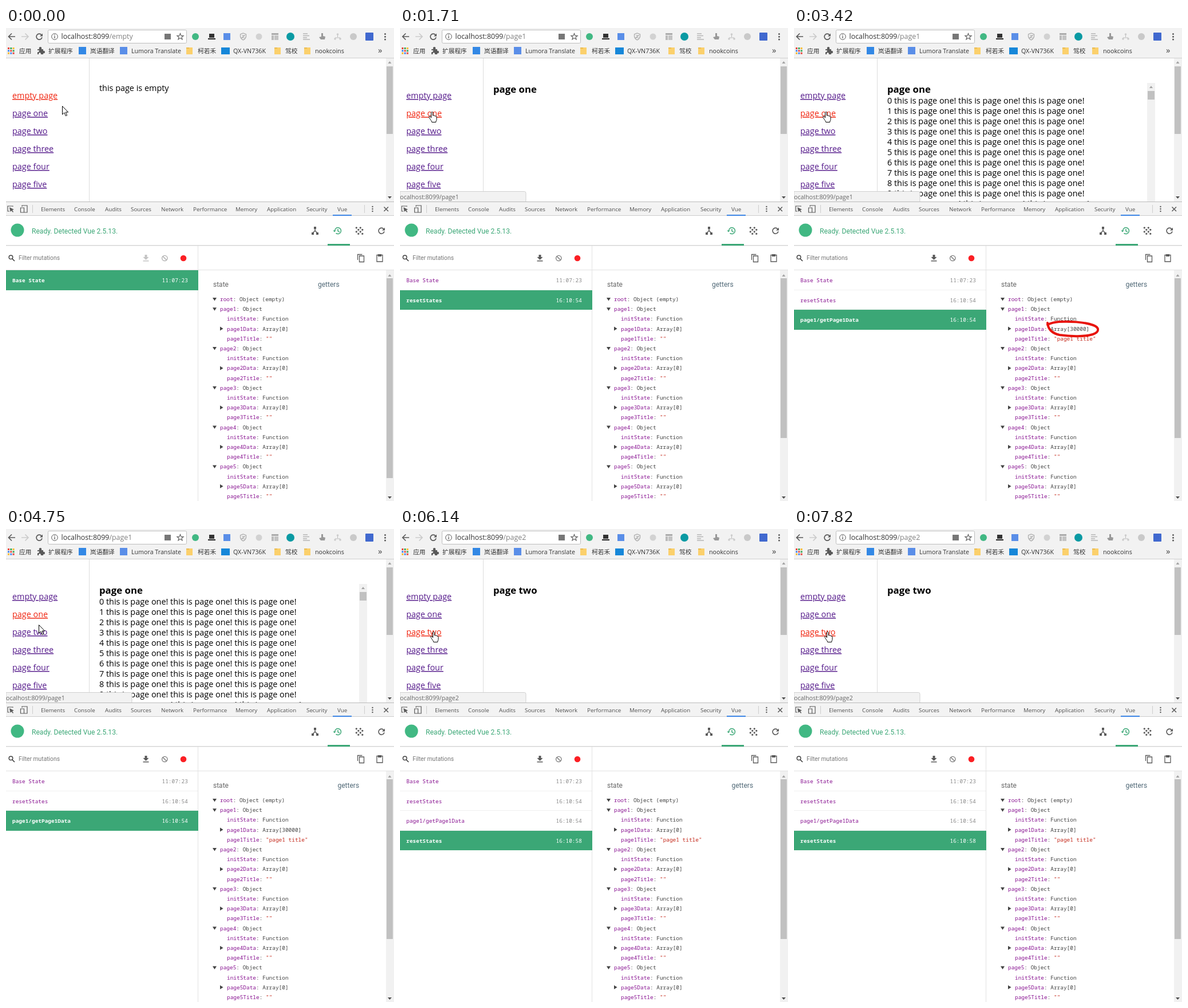
Animation, 678 px wide and 826 px high, one loop 8000 ms. Source, as an HTML page:

```html
<!DOCTYPE html>
<html lang="en">
<head>
<meta charset="utf-8">
<title>State inspector demo</title>
<style>
  html, body { margin: 0; width: 100%; height: 100%; overflow: hidden; background: #fff; }
  svg { display: block; }
  text { white-space: pre; }
  .ui { font-family: "Open Sans", "Noto Sans CJK SC", "Noto Sans CJK", sans-serif; }
  .app { font-family: Roboto, sans-serif; }
  .mono { font-family: "Noto Sans Mono", "DejaVu Sans Mono", monospace; font-size: 9.45px; }
  .link { text-decoration: underline 1px; }
  .bold { font-weight: 700; }
</style>
</head>
<body>
<svg id="stage" width="678" height="826" viewBox="0 0 678 826">
  <defs><clipPath id="page"><path d="M0 53H678V304H0z"/></clipPath></defs>
  <g id="base"></g>
  <g id="live"></g>
</svg>
<script>
const LOOP = 8000;
const STEPS = [0, 320, 670, 1350, 1710, 3070, 3420, 4750, 5100, 5460, 6140, 6470, 7820];
const GREEN = '#3ba776', KEY = '#881391', INK = '#5a5a5a', PALE = '#c4c4c4';

const text = (x, y, s, size, fill, cls = 'ui') =>
  `<text x="${x}" y="${y}" class="${cls}" ${size ? `font-size="${size}"` : ''} fill="${fill}">${s}</text>`;
const mono = (x, y, s, fill, cls = '') => text(x, y, s, 0, fill, 'mono ' + cls);
const rect = (x, y, w, h, fill, more = '') =>
  `<rect x="${x}" y="${y}" width="${w}" height="${h}" fill="${fill}" ${more}/>`;
const dot = (x, y, r, fill, more = '') => `<circle cx="${x}" cy="${y}" r="${r}" fill="${fill}" ${more}/>`;
const shape = (d, fill, more = '') => `<path d="${d}" fill="${fill}" ${more}/>`;
const line = (d, color, w = 1, more = '') =>
  `<path d="${d}" fill="none" stroke="${color}" stroke-width="${w}" ${more}/>`;
const at = (x, y, s) => `<g transform="translate(${x} ${y})">${s}</g>`;
const range = (n, f) => Array.from({ length: n }, (_, i) => f(i)).join('');

const upArrow = (x, y) => shape(`M${x - 3} ${y + 2}l3-4 3 4z`, '#a3a3a3');
const downArrow = (x, y) => shape(`M${x - 3.5} ${y - 2}l3.5 4 3.5-4z`, '#505050');
const reload = (x, y, r, color, w) => at(x, y,
  line(`M${r * .8} ${-r * .6}A${r} ${r} 0 1 0 ${r} ${r * .25}`, color, w) +
  shape(`M${r + 1} ${-r - .5}v${r}h${-r}z`, color));

function addressBar() {
  const folder = x => rect(x, 34, 11, 12, '#fbd06c') + rect(x, 34, 5, 2, '#e9bb51');
  const label = (x, s) => text(x, 44, s, 10.7, '#333');
  const colors = ['#e8453c', '#3aa757', '#f9bb2d', '#4688f1'];
  return rect(0, 0, 678, 52, '#f2f2f2') + rect(0, 52, 678, 1, '#cfcfcf') +
    line('M16 15H5M10 9.5L4.5 15l5.5 5.5', INK, 1.7) +
    line('M27 15h11M33.5 9.5l5.5 5.5-5.5 5.5', '#cbcbcb', 1.7) +
    reload(58, 15, 5, INK, 1.7) +
    rect(73.5, 3.5, 242, 23, '#fff', 'rx="2" stroke="#bdbdbd"') +
    dot(85, 15, 5.3, 'none', `stroke="${INK}"`) + rect(84.4, 14, 1.3, 4, INK) + rect(84.4, 11.5, 1.3, 1.4, INK) +
    rect(277, 10, 11, 10, '#777') +
    line('M304.5 9.5l1.6 4h4l-3.2 2.5 1.2 4-3.6-2.4-3.6 2.4 1.2-4-3.2-2.5h4z', INK, 1.1) +
    // extension buttons
    dot(331, 15, 6, '#41b883') +
    rect(355, 10, 9, 7, '#333') + rect(353, 18, 13, 2, '#222') +
    rect(380, 9, 12, 12, '#5a8ee8') +
    line('M414.5 9l5 2v4q-1 4-5 6q-4-2-5-6v-4zM412 13h5l-5 4h5', '#aaa', 1.2) +
    dot(442, 15, 5.5, '#d2d2d2') +
    rect(464, 9, 12, 3, '#aaa') + rect(464, 13, 4, 8, '#bbb') + rect(469, 13, 7, 8, '#c3c3c3') +
    dot(497, 15, 7, '#0a9aa3') +
    line('M519 10h8M519 13.5h11M519 17h7M519 20h12', '#b5b5b5', 1.6) +
    shape('M551 9h3v5l4 1-1 5h-7l-3-4 4-1z', '#999') +
    line('M579.5 11v5M575 20v-3h9v3', '#bbb') +
    dot(579.5, 11, 1.8, '#ccc') + dot(575, 19, 1.8, '#ccc') + dot(584, 19, 1.8, '#ccc') +
    dot(607, 15, 6, '#c9c9c9') +
    rect(628, 8, 14, 14, '#4169cf', 'rx="1"') +
    range(3, i => dot(662.5, 10.5 + i * 4.7, 1.5, INK)) +
    // bookmarks
    range(9, i => rect(3 + i % 3 * 4.3, 34 + (i / 3 | 0) * 4.3, 3, 3, colors[i % 4])) +
    label(23, '应用') +
    shape('M55 37h3q-1-4 2-4t2 4h3v3q3-1 3 2t-3 2v2h-4q0-3-2-3t-2 3h-2v-4q3 0 3-2t-3-1z', INK) +
    label(74, '扩展程序') + rect(127, 33, 13, 13, '#3388e5') + label(147, '岚语翻译') +
    rect(199, 33, 13, 13, '#5a8ee8') + label(219, 'Lumora Translate') +
    folder(315) + label(335, '柯若禾') + rect(376, 34, 15, 12, '#1687d9') + label(397, 'QX-VN736K') +
    folder(469) + label(488, '驾校') + folder(521) + label(540, 'nookcoins') +
    text(650, 44, '»', 15, '#444');
}

function devtools() {
  const tabs = { Elements: 61, Console: 119, Audits: 173, Sources: 218, Network: 271, Performance: 327,
    Memory: 401, Application: 456, Security: 525, Vue: 579 };
  const nodes = [[-4, 5], [4, 5], [0, -5]].map(([x, y]) => rect(x - 2, y - 2, 4, 4, INK)).join('');
  return rect(0, 304, 678, 24, '#f3f3f3') + rect(0, 303, 678, 1, '#bbb') + rect(0, 327, 678, 1, '#ccc') +
    line('M12 312V311H3V320H6', INK, 1.2) + shape('M6 313l8 4-3 1 2 3-1 1-2.5-3-2 2z', INK) +
    line('M28 312V310H37V322H32M25.5 314h6v8h-6z', INK, 1.2) + rect(46, 309, 1, 14, '#ccc') +
    Object.entries(tabs).map(([s, x]) => text(x, 320, s, 9.8, '#4f4f4f')).join('') +
    rect(571, 326, 33, 2, '#3f87e5') + rect(626, 309, 1, 14, '#ccc') +
    range(3, i => dot(640.5, 312 + i * 4, 1.2, INK)) +
    line('M660.5 312.5l7.5 7.5M668 312.5l-7.5 7.5', INK, 1.5) +
    // panel header
    rect(0, 379, 678, 1, '#d5d5d5') + rect(0, 380, 678, 1, '#ececec') +
    dot(20, 353, 11.5, '#41b883') + text(45, 359, 'Ready. Detected Vue 2.5.13.', 12.1, GREEN, 'app') +
    at(540, 354, nodes + line('M0-3V0L-4 4M0 0l4 4', INK, 1.5)) +
    at(579.5, 354, line('M-5 0A5.5 5.5 0 1 1-3 4.3M.5-3V.5l3 2', GREEN, 1.5) + shape('M-8-.5h5l-2.5 3z', GREEN)) +
    rect(562, 377, 39, 3, GREEN) +
    at(617.5, 354, range(16, i => (i + (i >> 2)) % 2 ? '' : dot(i % 4 * 3.5 - 5.2, (i >> 2) * 3.5 - 5.2, 1.6, INK))) +
    reload(656, 354, 5, INK, 1.6) +
    // panel toolbars
    rect(0, 422, 678, 1, '#e2e2e2') + rect(335, 380, 1, 446, '#e2e2e2') +
    line('M10.5 402.5L15 407', '#444', 1.7) + dot(8.5, 400.3, 3.3, 'none', 'stroke="#444" stroke-width="1.5"') +
    text(22, 405, 'Filter mutations', 10.3, '#777', 'app') + dot(310, 402, 5.3, '#fb1f24') +
    line('M614.5 405v-9.5h8M617.5 398h8v10.5h-8z', INK, 1.3) +
    line('M648 396.5h10v11.5h-10z', INK, 1.3) + rect(650, 395, 6, 4, INK);
}

function pageView(s) {
  const names = ['empty', 'one', 'two', 'three', 'four', 'five'];
  const links = names.map((n, i) => text(11, 123 + i * 31, i ? 'page ' + n : 'empty page', 14.4,
    i === s.page ? '#f0240f' : '#551a8b', 'ui link')).join('');
  const title = s.page
    ? text(163, 112.5, 'page ' + names[s.page], 16.8, '#000', 'ui bold')
    : text(163, 110, 'this page is empty', 14.4, '#000');
  const rows = range(11, i => text(163, 132 + i * 18, i + ' this is page one!'.repeat(3), 14.4, '#000'));
  const list = rows + rect(617, 96, 14, 208, '#f1f1f1') + upArrow(624, 103) + rect(618, 110, 12, 15, '#c1c1c1');
  const status = shape('M0 285.5H217.5Q220 285.5 220 288.5V304H0z', '#f2f2f2', 'stroke="#cfcfcf"') +
    text(-2.7, 299, 'localhost:8099/page' + s.hover, 10.6, '#666');
  return `<g clip-path="url(#page)">${rect(145, 53, 1, 251, '#dcdcdc')}${links}${title}${s.list ? list : ''}` +
    rect(664, 53, 14, 251, '#f1f1f1') + upArrow(670.5, 60) + rect(665, 67, 11, 118, '#c1c1c1') + downArrow(670.5, 296) +
    (s.hover ? status : '') + rect(0, 303, 678, 1, '#bbb') + '</g>';
}

function mutations(s) {
  const log = [['Base State', '11:07:23'], ['resetStates', '16:10:54'], ['page1/getPage1Data', '16:10:54'], ['resetStates', '16:10:58']];
  const top = i => Math.round(423 + i * 34.5);
  return log.slice(0, s.log).map(([name, time], i) => {
    const on = i === s.log - 1, y = top(i), base = 444 + i * 34.5;
    return (on ? rect(0, y, 336, top(i + 1) - y, GREEN) : rect(0, top(i + 1) - 1, 335, 1, '#f0f0f0')) +
      mono(11, base, name, on ? '#fff' : KEY, on ? 'bold' : '') + mono(272.5, base, time, on ? '#fff' : '#8a8a8a');
  }).join('');
}

function stateTree(s) {
  let row = 0;
  const put = (depth, key, value, arrow, color = '#444') => {
    const x = 374 + depth * 12, y = 477 + 17.2 * row++;
    return (arrow === 'open' ? shape(`M${x - 13} ${y - 6}h7l-3.5 5.5z`, '#444') : '') +
      (arrow === 'shut' ? shape(`M${x - 12} ${y - 7}v7l5.5-3.5z`, '#444') : '') +
      mono(x, y, `${key}<tspan fill="#444">: </tspan><tspan fill="${color}">${value}</tspan>`, KEY);
  };
  const group = i => {
    const p = 'page' + (i + 1), first = i === 0;
    return put(0, p, 'Object', 'open') + put(1, 'initState', 'Function') +
      put(1, p + 'Data', `Array[${first ? s.size : 0}]`, 'shut') +
      put(1, p + 'Title', first && s.log > 2 ? '"page1 title"' : '""', '', '#c4281a');
  };
  return text(362, 452, 'state', 12, '#666', 'app') + text(s.log > 2 ? 579.5 : 545, 452, 'getters', 12, '#526a78', 'app') +
    put(0, 'root', 'Object (empty)', 'open') + range(5, group) +
    rect(664, 423, 14, 403, '#f1f1f1') + upArrow(670.5, 432) +
    rect(665, 437, 11, s.log > 1 ? 279 : 349, '#c1c1c1') + downArrow(670.5, 820);
}

function buttons(s) {
  const c = s.ready ? INK : PALE, ban = s.ready ? '#777' : '#aaa';
  return shape('M242.5 396h4v4h3l-5 5-5-5h3z', c) + rect(239.5, 406, 10, 1.5, c) +
    dot(277.3, 402, 4.7, 'none', `stroke="${ban}" stroke-width="1.3"`) + line('M274 398.7l6.6 6.6', ban, 1.3);
}

// hand-drawn ring, narrowed to fit the shorter value
function ring(width) {
  return `<g transform="translate(441 0) scale(${width} 1) translate(-441 0)">` +
    line('M443 515C444 526 450 533 464 536C484 539 510 539 522 535C534 531 534 523 523 519C507 513 480 512 463 513C453 514 447 516 443 518',
      '#e8140c', 4, 'stroke-linecap="round" vector-effect="non-scaling-stroke"') + '</g>';
}

const pointer = shape('M.5 .5V15l3.4-3.2 2.4 5.7 2.3-1-2.4-5.500h4.5z', '#fff', 'stroke="#000"');
const hand = shape('M4.5 2C4.5 0 7.3 0 7.3 2V7C8.2 6 9.6 6.3 9.7 7.5C10.7 6.7 12 7.2 12 8.3C13 7.8 14 8.5 14 9.7V13.5C14 15.5 12.7 16 12.7 18.5H5.7C5.7 16.5 3.5 15 2.5 12.7L.7 9.7C.2 8.3 1.7 7.5 2.7 8.7L4.5 10.5z',
  '#fff', 'stroke="#000"');

function cursor(t) {
  if (t < 320) return at(98, 136, pointer);
  if (t < 4750) return at(50, 146, hand);
  if (t < 5100) return at(57, 167, pointer);
  return at(t < 5460 ? 52 : 53, 179, hand);
}

function draw(t) {
  const s = {
    page: t < 1350 ? 0 : t < 6140 ? 1 : 2,
    hover: t < 670 ? 0 : t < 5100 ? 1 : 2,
    log: t < 1350 ? 1 : t < 3420 ? 2 : t < 6140 ? 3 : 4,
    list: t >= 3070 && t < 6140,
    size: t >= 3420 && t < 6140 ? 30000 : 0,
    ready: t >= 1710
  };
  const path = s.page ? 'page' + s.page : 'empty';
  live.innerHTML =
    text(96.5, 19, `localhost:8099<tspan fill="#808080">/${path}</tspan>`, 12.45, '#333') +
    pageView(s) + mutations(s) + stateTree(s) + buttons(s) +
    (t >= 3420 && t < 4750 ? ring(1) : t >= 6470 && t < 7820 ? ring(.75) : '') + cursor(t);
}

const live = document.getElementById('live');
document.getElementById('base').innerHTML = addressBar() + devtools();
let shown = -1;
function tick() {
  const t = performance.now() % LOOP;
  const step = STEPS.findLastIndex(start => start <= t);
  if (step !== shown) draw(STEPS[shown = step]);
  requestAnimationFrame(tick);
}
tick();
</script>
</body>
</html>
```
